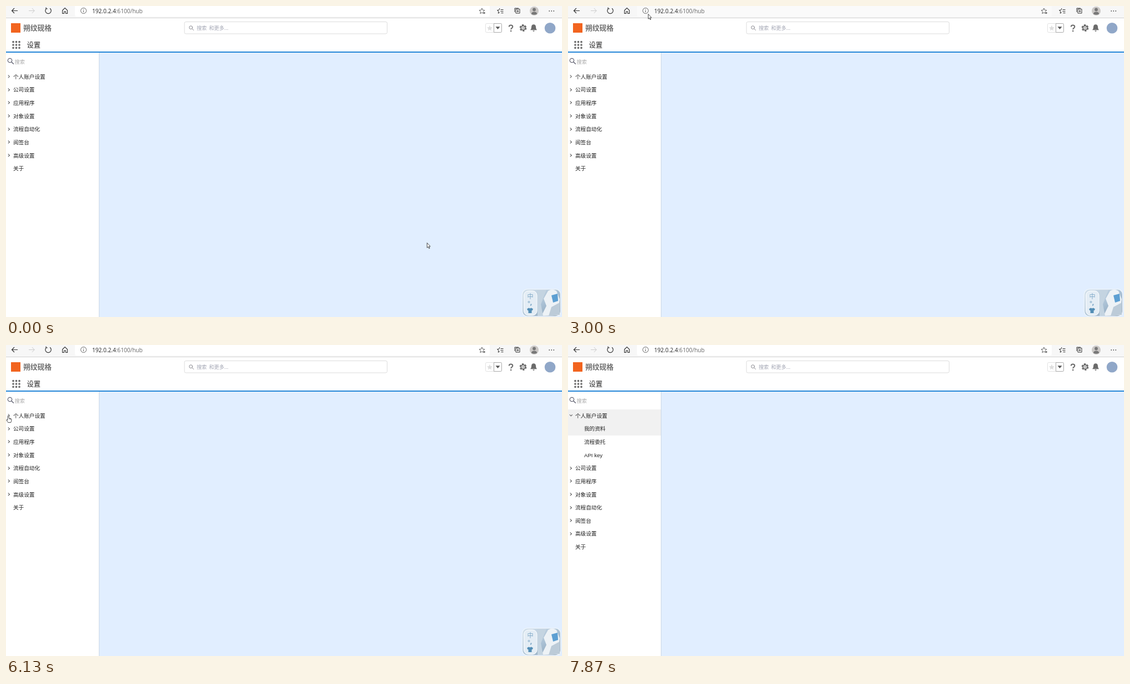
An HTML page for the animation above (8 s loop, 1000 px wide and 560 px high).

```html
<!DOCTYPE html>
<html lang="zh-CN">
<head>
<meta charset="utf-8">
<title>设置</title>
<style>
html, body { margin: 0; width: 100%; height: 100%; overflow: hidden; background: #fff; }
body { position: relative; font-family: "Noto Sans CJK SC", "Noto Sans CJK", sans-serif; }
svg { position: absolute; left: 0; top: 0; overflow: hidden; }
.line { fill: none; stroke: #333; stroke-width: 1; }
.grey { fill: #6b6b6b; }

/* side menu */
#menu { position: absolute; left: 0; top: 115.7px; width: 167px; font-size: 9.63px; color: #222; }
.row { position: relative; height: 23.65px; line-height: 23.65px; padding-left: 13px; white-space: pre; }
.sub .row { padding-left: 29px; }
.branch::before {
  content: ""; position: absolute; left: 1.7px; top: 9.5px; width: 3.4px; height: 3.4px;
  border: solid #555; border-width: 1px 1px 0 0; transform: rotate(45deg);
}
.latin { font-family: "Liberation Sans", Arial, sans-serif; }
.sub { overflow: hidden; height: 0; }

/* every moving part shares one 8 s clock with hard steps */
.sub, #first, #first::before, #second, #widget, #bar, #pointer, #arrow, #hand {
  animation: 8s step-end infinite;
}
.sub { animation-name: expand; }
#first { animation-name: select; }
#first::before { animation-name: turn; }
#second { animation-name: hover; }
#widget { animation-name: dismiss; }
#bar { animation-name: bar; }
#pointer { animation-name: travel; }
#arrow { animation-name: arrow; }
#hand { animation-name: hand; }

@keyframes expand {
  0% { height: 0; } 90.8% { height: 15px; } 91.6% { height: 39px; } 92.45% { height: 57.7px; }
  93.3% { height: 65px; } 94.1% { height: 69px; } 95%, 100% { height: 70.95px; }
}
@keyframes select { 0% { background: transparent; } 90%, 100% { background: #f1f1f1; } }
@keyframes hover { 0% { background: transparent; } 96.6%, 100% { background: #f1f1f1; } }
@keyframes turn {
  0% { transform: rotate(45deg); }
  90.8% { transform: translateY(-1px) rotate(90deg); }
  91.6%, 100% { transform: translate(.9px, -1.5px) rotate(135deg); }
}
@keyframes dismiss { 0% { opacity: 1; } 88.3% { opacity: .6; } 89.1% { opacity: .25; } 90%, 100% { opacity: 0; } }
@keyframes bar { 0% { fill: #fff; } 34.1% { fill: #fafafa; } 38.3%, 100% { fill: #fff; } }
@keyframes arrow { 0% { opacity: 1; } 67.4%, 100% { opacity: 0; } }
@keyframes hand { 0% { opacity: 0; } 67.4%, 100% { opacity: 1; } }
@keyframes travel {
  0% { transform: translate(757px, 426px); }
  .85% { transform: translate(757px, 426px); animation-timing-function: steps(3, start); }
  3.3% { transform: translate(390px, 184px); }
  4.1% { transform: translate(394px, 182px); }
  7.5% { transform: translate(450px, 243px); }
  8.3% { transform: translate(597px, 405px); }
  9.1% { transform: translate(1040px, 640px); }
  11.6% { transform: translate(998px, 548px); }
  12.5% { transform: translate(998px, 517px); }
  13.3% { transform: translate(998px, 486px); }
  14.1% { transform: translate(1040px, 500px); }
  15.8% { transform: translate(994px, 541px); }
  16.6% { transform: translate(988px, 515px); }
  17.45% { transform: translate(981px, 490px); }
  18.3% { transform: translate(981px, 490px); animation-timing-function: steps(10, start); }
  26.6% { transform: translate(590px, 172px); animation-timing-function: steps(5, start); }
  30.8% { transform: translate(34px, 24px); }
  31.6% { transform: translate(28px, 20px); }
  32.4% { transform: translate(28px, 20px); animation-timing-function: steps(6, start); }
  37.4% { transform: translate(180px, 5px); animation-timing-function: steps(3, start); }
  39.9% { transform: translate(72px, 32px); animation-timing-function: steps(6, start); }
  44.95% { transform: translate(205px, 164px); }
  45.8% { transform: translate(205px, 164px); animation-timing-function: steps(3, start); }
  48.3% { transform: translate(248px, 133px); }
  50% { transform: translate(247px, 133px); }
  54.1% { transform: translate(244px, 132px); }
  55% { transform: translate(241px, 132px); }
  59.1% { transform: translate(238px, 131px); }
  64.1% { transform: translate(238px, 131px); animation-timing-function: steps(7, start); }
  70% { transform: translate(92px, 135px); animation-timing-function: steps(6, start); }
  75% { transform: translate(6px, 127px); }
  76.6% { transform: translate(4px, 127px); }
  95% { transform: translate(5px, 133px); }
  95.8% { transform: translate(4px, 139px); }
  96.6% { transform: translate(2px, 144px); }
  97.4% { transform: translate(-3px, 147px); }
  98.3%, 100% { transform: translate(-30px, 148px); }
}
</style>
</head>
<body>
<svg width="1000" height="560" viewBox="0 0 1000 560">
  <defs>
    <linearGradient id="photo" x2="1" y2="1">
      <stop offset="0" stop-color="#d5e2ed"/><stop offset=".55" stop-color="#a9c0d4"/><stop offset="1" stop-color="#8198ad"/>
    </linearGradient>
    <path id="star" d="M0-5L1.5-1.6 5-1.3 2.4 1.1 3.1 4.6 0 2.8-3.1 4.6-2.4 1.1-5-1.3-1.5-1.6Z"/>
  </defs>

  <!-- browser toolbar -->
  <rect width="1000" height="21" fill="#f7f7f7"/>
  <rect id="bar" x="124" y="-6" width="746" height="25" rx="3"/>
  <path d="M0 21.5H1000" stroke="#d2d2d2"/>
  <g class="line">
    <path d="M21 8.5H10.5M15 4L10.5 8.5 15 13" stroke-width="1.2"/>
    <path d="M41 8.5H51M46.8 4L51.2 8.5 46.8 13" stroke="#ccc"/>
    <path d="M73 4.2A5.2 5.2 0 1 0 79 4.2M72 2.5V5H74.8" stroke-width="1.2"/>
    <path d="M101.5 8L106 3.5 110.500 8V13.500H107.500V10H104.500V13.500H101.500Z" stroke-width="1.1"/>
    <circle cx="139.500" cy="8.500" r="5" stroke="#666"/>
    <path d="M139.500 7.800V11.300M139.500 5.500V6.600" stroke="#666"/>
    <use href="#star" x="856" y="9" stroke="#555" stroke-width=".9"/>
    <path d="M859 12.500H862M860.500 11V14" stroke="#555"/>
    <path d="M888 4L886.700 7.300 883.500 7.600 886 10 885.200 13.200 888 11.500M889.500 6.500H894.500M889.500 9.500H894.500M890.500 12.500H894.500"/>
    <path d="M917 5.500H924V13H917ZM915 11V4H922M920.500 7.200V11.300M918.500 9.200H922.500"/>
  </g>
  <circle cx="950" cy="9" r="8" fill="#cbc8c6"/>
  <circle cx="950" cy="6.500" r="2.900" fill="#777"/>
  <path d="M945 14.500Q945 10.500 950 10.500T955 14.500Q950 17 945 14.500" fill="#777"/>
  <path d="M976.500 9H978M980.500 9H982M984.500 9H986" stroke="#333" stroke-width="1.400"/>
  <text x="155" y="12.500" font-size="10.100" font-family="Open Sans, Noto Sans, sans-serif" fill="#222">192.0.2.4<tspan fill="#666">:6100/hub</tspan></text>

  <!-- app header -->
  <rect x="9" y="31" width="17" height="17" fill="#f2641f"/>
  <text x="31" y="44.300" font-size="12.750" font-weight="700" fill="#707070">朔纹砚格</text>
  <rect x="321" y="28.500" width="364.500" height="21.500" rx="2.500" fill="#fff" stroke="#dcdcdc"/>
  <g class="line" stroke-linecap="round">
    <circle cx="332.500" cy="38.700" r="2.900" stroke="#85858c"/>
    <path d="M334.800 41L337.500 43.700" stroke="#85858c"/>
    <circle cx="7" cy="98" r="3.700" stroke="#5f6070" stroke-width="1.200"/>
    <path d="M9.800 100.800L13.500 104.300" stroke="#5f6070" stroke-width="1.400"/>
  </g>
  <text x="343" y="42.600" font-size="9.100" fill="#a2a5b3" xml:space="preserve">搜索  和更多...</text>
  <rect x="862.500" y="31.500" width="29" height="16" rx="2" fill="#fff" stroke="#e2e2e2"/>
  <path d="M877.500 31.500H889.500Q891.500 31.500 891.500 33.500V45.500Q891.500 47.500 889.500 47.500H877.500Z" fill="#fff" stroke="#aaa"/>
  <use href="#star" x="870" y="39.800" fill="#dedede"/>
  <path d="M880.500 37.300H888.500L884.500 42Z" fill="#555"/>
  <path d="M904.800 37.500Q904.800 34.600 908 34.600T911.300 37.400C911.300 39.700 908.200 39.600 908.200 42.300" fill="none" stroke="#6b6b6b" stroke-width="2"/>
  <circle class="grey" cx="908.200" cy="45" r="1.300"/>
  <circle cx="930" cy="39.500" r="5.300" fill="none" stroke="#6b6b6b" stroke-width="2.200" stroke-dasharray="3.300 2.250"/>
  <circle cx="930" cy="39.500" r="3.700" fill="none" stroke="#6b6b6b" stroke-width="2"/>
  <circle class="grey" cx="930" cy="39.500" r="1.200"/>
  <path class="grey" d="M943 43.300Q945 41.500 945 38Q945 33.300 949 33.300T953 38Q953 41.500 955 43.300ZM947.300 44.300H950.700Q950.500 46 949 46T947.300 44.300"/>
  <circle cx="978.500" cy="39.800" r="9.800" fill="#90a7c8"/>
  <path d="M13 64.700h.01m5.490 0h.01m5.490 0h.01M13 70h.01m5.490 0h.01m5.490 0h.01M13 75.300h.01m5.490 0h.01m5.490 0h.01" stroke="#6b6b6b" stroke-width="3.700" stroke-linecap="round"/>
  <text x="37.500" y="74.600" font-size="12.300" fill="#222">设置</text>

  <!-- work area -->
  <rect x="167" y="83" width="833" height="477" fill="#e1eeff"/>
  <path d="M167.500 84V560" stroke="#cbd7e5"/>
  <path d="M0 83H1000" stroke="#2486d8" stroke-width="2"/>
  <text x="15.500" y="103.800" font-size="9.200" fill="#aaa">搜索</text>

  <!-- input method widget -->
  <g id="widget">
    <rect x="928.500" y="510" width="69" height="49" rx="9" fill="url(#photo)" stroke="#edf4fb" stroke-width="1.500"/>
    <path d="M963 558L972 540 967 527 975 513Q982 508 990 513L996 528 994 545 997 557Z" fill="#edf2f6"/>
    <path d="M976 558L981 542 996 534V556Z" fill="#bccbd8"/>
    <path d="M981 521L992 518 993 531 984 534Z" fill="#5d9fd2"/>
    <path d="M956 511H972L962 537 966 558H956Z" fill="#c4d4e1"/>
    <rect x="931.500" y="513" width="23.500" height="44" rx="8" fill="#e4edf5" stroke="#fff"/>
    <g fill="#7ba6c6">
      <text x="937.500" y="526.500" font-size="11">中</text>
      <circle cx="940.500" cy="533" r="1.400" fill="none" stroke="#7ba6c6"/>
      <path d="M943.500 536.500H945.500V538L944 540H943Z"/>
      <path d="M940.500 543.500Q942.500 545.500 944.500 543.500L948 545.500 946.500 548.500 945.500 548V553H939.500V548L938.500 548.500 937 545.500Z" fill="#528db5"/>
    </g>
  </g>
</svg>

<div id="menu">
  <div class="row branch" id="first">个人账户设置</div>
  <div class="sub">
    <div class="row" id="second">我的资料</div>
    <div class="row">流程委托</div>
    <div class="row latin">API key</div>
  </div>
  <div class="row branch">公司设置</div>
  <div class="row branch">应用程序</div>
  <div class="row branch">对象设置</div>
  <div class="row branch">流程自动化</div>
  <div class="row branch">阅签台</div>
  <div class="row branch">高级设置</div>
  <div class="row">关于</div>
</div>

<svg width="1000" height="560" viewBox="0 0 1000 560">
  <g id="pointer" fill="#fff" stroke="#222" stroke-width=".8" stroke-linejoin="round">
    <path id="arrow" d="M.3.500V9.300L2.300 7.500 3.800 10.700 5.100 10.100 3.700 7H6.200Z"/>
    <path id="hand" d="M-1 1.400Q-1 .4 .1 .4T1.200 1.400V5L5 5.800Q6.100 6.200 5.900 7.500L5.500 10.300 4.700 12.600H-.2L-2.900 8.700Q-3.200 7.200-2.100 7.300L-1 8.400ZM2.700 5.400V7M4.200 5.700V7.200"/>
  </g>
</svg>
</body>
</html>
```
